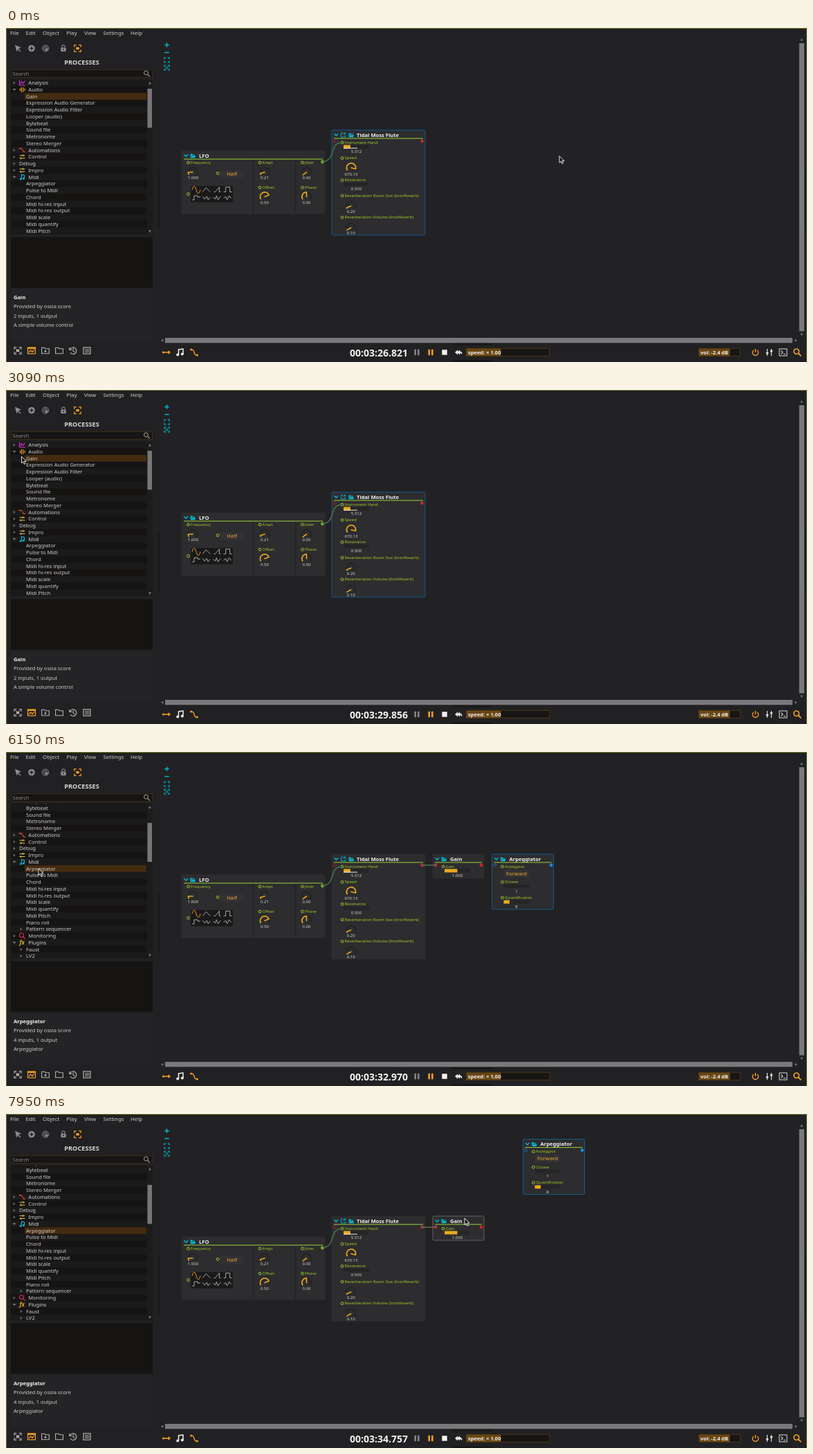
An HTML page for the animation above (7990 ms loop, 1158x484 px).

```html
<!DOCTYPE html>
<html lang="en">
<head>
<meta charset="utf-8">
<title>Process graph</title>
<style>
html, body { margin: 0; width: 100%; height: 100%; overflow: hidden; background: #212022; }
svg { display: block; width: 1158px; height: 484px; font-family: "Noto Sans", "Open Sans", sans-serif; font-size: 7.6px; }
text { fill: #cfcdcb; white-space: pre; }
.b { font-weight: 700; fill: #f2f2f2; }
.port { font-size: 5.95px; fill: #9cc92c; }
.val { font-size: 6px; fill: #d6d3ce; text-anchor: middle; }
.btn { font-size: 7.7px; fill: #e8a92c; text-anchor: middle; }
.ln { fill: none; stroke-width: 1.2; }
</style>
</head>
<body>
<svg id="stage" viewBox="0 0 1158 484"></svg>
<script>
const LOOP = 7990, ROW = 9.75;
const ORANGE = '#f0a020', CYAN = '#03bcd8', GREY = '#8f8d8f', GREEN = '#a0cc2c', RED = '#c42a2a', BLUE = '#1d86d8';

const text = (x, y, s, cls = '', more = '') => `<text x="${x}" y="${y}" class="${cls}" ${more}>${s}</text>`;
const rect = (x, y, w, h, fill, more = '') => `<rect x="${x}" y="${y}" width="${w}" height="${h}" fill="${fill}" ${more}/>`;
const line = (d, color, w = 1.2, more = '') => `<path class="ln" d="${d}" stroke="${color}" style="stroke-width:${w}" ${more}/>`;
const fill = (d, color) => `<path d="${d}" fill="${color}"/>`;
const dot = (x, y, color, r = 2.4) => `<circle cx="${x}" cy="${y}" r="${r}" fill="${color}"/>`;
const ring = (x, y, color = GREEN, r = 1.9, w = 1) => `<circle cx="${x}" cy="${y}" r="${r}" fill="none" stroke="${color}" stroke-width="${w}"/>`;
const at = (x, y, s) => `<g transform="translate(${x} ${y})">${s}</g>`;
const group = (id, s) => `<g id="${id}">${s}</g>`;

const corners = (r, c, w = 1.2) => {
  const k = r * 0.35;
  return line(`M${-r} ${-k}V${-r}H${-k}M${k} ${-r}H${r}V${-k}M${r} ${k}V${r}H${k}M${-k} ${r}H${-r}V${k}`, c, w);
};
const lens = (c, w = 1.3) => ring(-1, -1, c, 3, w) + line('M1.3 1.3L4.3 4.3', c, w * 1.2);
const folder = (c, k = 1) => line(`M${-4.5 * k} ${3.5 * k}V${-3.5 * k}H${-k}L0 ${-2.3 * k}H${4.5 * k}V${3.5 * k}Z`, c, 1.1);

// node parts
const port = (x, y, s) => ring(x, y) + text(x + 3.6, y + 1.8, s, 'port');
const value = (x, y, s) => text(x, y, s, 'val');
const slider = (x, y, w, v) => rect(x, y, w, 5, '#252426') + rect(x, y, w * v, 5, '#e6aa1e');
const polar = (r, deg) => [r * Math.cos(deg * Math.PI / 180), r * Math.sin(deg * Math.PI / 180)].map(n => n.toFixed(2)).join(' ');
const arc = (a, b, c, w) => line(`M${polar(6.6, a)}A6.6 6.6 0 ${b - a > 180 ? 1 : 0} 1 ${polar(6.6, b)}`, c, w);
const knob = (x, y, a) => at(x, y, arc(145, 395, '#222123', 1.6) +
  (a > 150 ? arc(145, a, '#e6aa1e', 1.7) : '') + line(`M0 0L${polar(6.6, a)}`, '#e6aa1e', 1.6, 'stroke-linecap="round"'));
const button = (x, y, w, h, s) => rect(x, y, w, h, '#343134', 'rx="1"') + text(x + w / 2, y + h / 2 + 2.7, s, 'btn');

function node(id, x, y, w, h, title, inner, ext) {
  const tx = x + (ext ? 36 : 25);
  return group(id, rect(x, y, w, h, '#2d2c2e', `rx="1.5" class="frame"`) +
    line(`M${x + 3.5} ${y + 5.3}l2.8 3 2.8-3`, CYAN, 1.3) +
    (ext ? at(x + 16.5, y + 7, line('M0-2.8H-3V3H3V0M0 0L3-3M1-3H3V-1', CYAN, .9)) : '') +
    at(x + (ext ? 28 : 16), y + 7.2, fill('M-3.5 3V-2.8H-.8L0-1.8H3V-.6H-2Z', CYAN) + fill('M-2 0H4.2L3 3H-3.2Z', CYAN)) +
    text(tx, y + 9.8, title, 'b') +
    rect(x + 3, y + 11.4, w - 6, 1.2, '#86b83a') + inner);
}

const wave = (x, y, d, c) => at(x, y, line(d, c, 1));
const waves = ['M-6 0C-4-7-2-7 0 0S4 7 6 0', 'M-6 3L-1-3L5 3', 'M-5 3H-3L3-4V3H5', 'M-6 3H-3V-4H3V3H6'];
const noisy = ['M-6 3H-3V-3H2V-1H6', 'M-6-2L-3 2L0-2L2 3L5-1', 'M-6-1L-3 2L-1-3L1 3L5-2', 'M-6 1L-3-2L-1 3L2-3L5 1'];

const lfo = node('lfo', 254, 178, 207, 91, 'LFO',
  rect(356.7, 191.5, 1.8, 76.5, '#242325') + rect(417.7, 191.5, 1.8, 76.5, '#242325') +
  port(263.5, 195, 'Frequency') + knob(270, 209, 180) + value(270.5, 218.8, '1.000') +
  ring(306, 210.5) + button(309, 206, 35, 11, 'Half') + ring(263.5, 240.5) +
  rect(267, 229, 61, 23.5, '#1a191a', 'rx="2"') +
  waves.map((d, i) => wave(275 + i * 15.2, 234.5, d, i ? '#a8a6a4' : ORANGE)).join('') +
  noisy.map((d, i) => wave(275 + i * 15.2, 246, d, '#a8a6a4')).join('') +
  port(367, 195, 'Ampl.') + knob(374, 209, 165) + value(374, 218.8, '0.21') +
  port(367, 231.2, 'Offset') + knob(374, 244.5, 338) + value(374, 255.3, '0.50') +
  port(428.5, 195, 'Jitter') + knob(434.5, 209, 145) + value(434.5, 218.8, '0.00') +
  port(428.5, 231.2, 'Phase') + knob(434.5, 244.5, 270) + value(434.5, 255.3, '0.00') +
  dot(457.5, 194, '#7db52c'));

const harp = node('harp', 471, 148, 135, 152, 'Tidal Moss Flute',
  ring(475, 164, '#8f2626', 2.2) + dot(601.5, 164, RED) +
  port(486, 166, 'Instrument Hand') + slider(488, 169.5, 37, .27) + rect(488, 173.6, 20, 1, '#eee') + value(506.5, 181, '5.312') +
  port(486, 188.5, 'Speed') + knob(499, 202.5, 375) + value(499, 213.5, '670.13') +
  port(486, 220.5, 'Resonance') + slider(488, 224, 37, 0) + value(506.5, 235.3, '0.500') +
  port(486, 243, 'Reverberation Room Size (InstrReverb)') + knob(498.7, 258, 158) + value(498.7, 267.8, '0.20') +
  port(486, 274.5, 'Reverberation Volume (InstrReverb)') + knob(498.7, 289.5, 152) + value(498.7, 299, '0.10'), true);

const gain = node('gain', 617, 148, 74, 35, 'Gain',
  dot(621, 164, RED) + dot(687, 164, RED) +
  port(632, 166, 'Gain') + slider(634, 169.5, 37, .5) + value(652.5, 181, '1.000'));

const arp = node('arp', 702.5, 148, 89, 80, 'Arpeggiator',
  ring(706.5, 164, '#1a70b5', 2.1) + dot(788, 164, BLUE) +
  port(717.5, 166, 'Arpeggios') + button(719, 170, 38, 12, 'Forward') +
  port(717.5, 188.5, 'Octave') + slider(719.5, 192, 37, 0) + value(738, 203.5, '1') +
  port(717.5, 211, 'Quantification') + slider(719.5, 214.7, 37, .23) + value(738, 226, '8'));

// process tree: > closed branch, v open branch, - leaf, + closed sub-branch
const tree = ['>Analysis', 'vAudio', '-Gain', '-Expression Audio Generator', '-Expression Audio Filter', '-Looper (audio)',
  '-Bytebeat', '-Sound file', '-Metronome', '-Stereo Merger', '>Automations', '>Control', '>Debug', '>Impro', 'vMidi',
  '-Arpeggiator', '-Pulse to Midi', '-Chord', '-Midi hi-res input', '-Midi hi-res output', '-Midi scale',
  '-Midi quantify', '-Midi Pitch', '-Piano roll', '+Pattern sequencer', '>Monitoring', 'vPlugins', '+Faust', '+LV2'];
const swap = line('M-4-2H4M-4 2H4', '#c9c76a', 1.1) + line('M1-3.5V-.5M-2 .5V3.5', ORANGE, 1.3);
const icons = {
  Analysis: line('M-4-4V3.5H4.5M-3 2L-1-2L1 1L4-3', '#d42fd0', 1.1),
  Audio: line('M-3-1.5V2M-1-3.5V4M1.5-3V3.5M3.7-1.5V1.5', ORANGE, 1.2),
  Automations: line('M-4-2.5H-1L2 2.5H4.5', '#e0492f', 1.2) + dot(-3.6, -2.4, '#e0492f', 1.1),
  Control: swap, Impro: swap,
  Midi: line('M-1 3V-3.5L3-2.5V2', CYAN, 1.1) + dot(-2.2, 3, CYAN, 1.4) + dot(1.8, 2.2, CYAN, 1.4),
  Monitoring: lens('#d62a50', 1.1),
  Plugins: text(-4, 2.6, 'fx', 'b', 'style="fill:#e6b41e;font-style:italic;font-size:8px"')
};
function row(s, i) {
  const kind = s[0], name = s.slice(1), y = 79.5 + i * ROW, leaf = kind === '-' || kind === '+';
  const ax = kind === '+' ? 22 : 12;
  const mark = kind === '-' ? '' : kind === 'v' ? fill(`M${ax - 2.5} ${y - 1.3}h5l-2.5 3Z`, '#777') : fill(`M${ax - 1.3} ${y - 2.3}v4.6l3-2.3Z`, '#666');
  return (i % 2 ? '' : rect(7, y - ROW / 2, 196, ROW, '#1b1a1a')) +
    (leaf && (name === 'Gain' || name === 'Arpeggiator') ? rect(27, y - ROW / 2, 176, ROW, '#442b10', `id="row${name}"`) : '') +
    mark + (icons[name] && !leaf ? at(23.5, y, icons[name]) : '') +
    text(leaf ? 29 : name === 'Debug' ? 19 : 32.3, y + 2.7, name);
}

const info = (id, lines) => group(id, lines.map((s, i) => text(11, 392.5 + i * 13.6, s, i ? '' : 'b')).join(''));
const menu = [[6, 'File'], [28.5, 'Edit'], [53, 'Object'], [87.5, 'Play'], [113, 'View'], [140.5, 'Settings'], [180, 'Help']];
const tri = (x, y, dx, dy) => fill(`M${x + 2.2 * dx} ${y + 2.2 * dy}L${x - 1.5 * dx + 2 * dy} ${y - 1.5 * dy + 2 * dx}L${x - 1.5 * dx - 2 * dy} ${y - 1.5 * dy - 2 * dx}Z`, '#747274');

const sidebar =
  menu.map(([x, s]) => text(x, 10, s, '', 'style="font-size:7.9px"')).join('') +
  at(17, 29.5, fill('M-4-5L5-1L1 .5L4.5 4L3.5 5L0 1.5L-1.5 5Z', GREY)) +
  at(37, 29.5, dot(0, 0, GREY, 4.8) + line('M-2.8 0H2.8M0-2.8V2.8', '#212022', 1.4)) +
  at(57, 29.5, ring(0, 0, GREY, 4.6, 1) + ring(0, 0, GREY, 2.5, 1) + fill('M-1-1L5 1.5L2.5 2.5L1.5 5Z', GREY)) +
  at(83, 29.5, rect(-3.7, -1, 7.4, 5.5, GREY, 'rx="1"') + line('M-2.2-1V-2.5A2.2 2.2 0 0 1 2.2-2.5V-1', GREY, 1.1) + dot(0, 1.8, '#212022', 1)) +
  at(103.5, 29.5, corners(4.8, ORANGE, 1.2) + rect(-2.2, -1.7, 4.4, 3.4, ORANGE)) +
  text(109.5, 52.7, 'PROCESSES', 'b', 'text-anchor="middle" style="fill:#d8d6d4;font-size:9.2px"') +
  rect(7.5, 60.5, 204, 11, '#161514', 'stroke="#3b2b14" stroke-width="1"') +
  text(9.5, 68.8, 'Search', '', 'style="fill:#8b8987"') + at(203.5, 66, lens('#a5a3a1', 1)) +
  rect(7, 75, 205, 224, '#151413') +
  `<g clip-path="url(#list)">${group('tree', tree.map(row).join(''))}</g>` +
  rect(203.5, 75, 8.5, 224, '#1d1c1d') + tri(208, 80, 0, -1) + tri(208, 294.5, 0, 1) +
  rect(204.5, 88, 6.5, 56.5, '#787678', 'id="thumb"') +
  rect(7, 303, 205, 73.5, '#151413') + rect(7, 378, 205, 75, '#242325') +
  info('infoGain', ['Gain', 'Provided by ossia score', '2 inputs, 1 output', 'A simple volume control']) +
  info('infoArp', ['Arpeggiator', 'Provided by ossia score', '4 inputs, 1 output', 'Arpeggiator']) +
  at(17, 467.5, corners(5, '#b5b3b1', 1.2) + line('M-4-4L4 4M4-4L-4 4', '#b5b3b1', 1) + rect(-2, -1.7, 4, 3.4, '#b5b3b1')) +
  at(37, 467.5, rect(-5.5, -4.5, 11, 9, 'none', `stroke="${ORANGE}" stroke-width="1.2"`) + line('M-5.5-3.5H5.5', ORANGE, 2) + line('M-4 2.5L-1.5-.5L1 2L4-1.5', ORANGE, 1.2)) +
  at(57, 467.5, folder('#b5b3b1', 1.2) + fill('M-2 2L0-1.5L2 2Z', '#b5b3b1')) +
  at(77, 467.5, folder('#b5b3b1', 1.2)) +
  at(97, 467.5, line('M-4.2-2A4.8 4.8 0 1 1-4 2.8M-5.2-4.5V-1.2H-2M0-3V.5L2.5 2', '#b5b3b1', 1.2)) +
  at(117, 467.5, rect(-5, -4.7, 10, 9.4, 'none', 'stroke="#b5b3b1" stroke-width="1.2"') + line('M-3-2H3.5M-3 0H3.5M-3 2H3.5', '#b5b3b1', .9));

const canvas =
  rect(222, 14, 924, 434, '#222124') + rect(219.5, 205, 2.5, 87, '#1a191b') +
  at(232.5, 24.5, line('M-3.2 0H3.2M0-3.2V3.2', CYAN, 1.4)) + at(232.5, 35.5, line('M-3.2 0H3.2', CYAN, 1.4)) +
  at(232.5, 46.5, corners(3.5, CYAN, 1.2)) + at(232.5, 57.5, corners(3.5, CYAN, 1.2) + ring(0, 0, CYAN, 1.4, 1)) +
  rect(230, 449, 907, 7.3, '#7a787a') + tri(226, 452.7, -1, 0) + tri(1142, 452.7, 1, 0) +
  rect(1146.7, 22, 7.3, 417.5, '#7a787a') + tri(1150.3, 17, 0, -1) + tri(1150.3, 444, 0, 1) +
  rect(645, 457.5, 58, 2, '#171617') + rect(645, 481.5, 58, 2.5, '#171617') + rect(1155.5, 205, 2, 87, '#1a191b');

const bar = (x, w, v, s) => rect(x, 464.3, w, 11.2, '#171615') + rect(x, 464.3, v, 11.2, '#6a4714') +
  rect(x, 464.3, w, 11.2, 'none', 'stroke="#4a3514" stroke-width="1"') + text(x + 2.5, 472.7, s, 'b', 'style="font-size:7.5px"');
const pause = c => rect(-3.6, -4.2, 2.6, 8.4, c) + rect(1, -4.2, 2.6, 8.4, c);
const transport =
  at(232, 470, line('M-5.5 0H4', ORANGE, 1.5) + dot(-4.5, 0, ORANGE, 1.6) + fill('M2.5-3L6 0L2.5 3Z', ORANGE)) +
  at(252, 470, line('M-2.5 3V-4L4-5V2', '#eee', 1.5) + dot(-3.8, 3.5, '#eee', 2) + dot(2.8, 2.5, '#eee', 2)) +
  at(272, 470, line('M-4.5-4C3-4-3 4 4.5 4', ORANGE, 1.4) + dot(-4.3, -4, ORANGE, 1.6) + dot(4.3, 4, ORANGE, 1.6)) +
  text(497, 475.6, '', 'b', 'id="clock" style="font-size:14px"') +
  at(594, 470, pause('#858385')) + at(614, 470, pause(ORANGE)) + rect(630.3, 466.3, 7.4, 7.4, '#f2f2f2') +
  at(654.5, 470, fill('M-5.5 0L-1.5-3.5V3.5Z', '#f2f2f2') + fill('M-2.5 0L1.5-3.5V-1.5Q5-1.5 5 3Q3.5 1.2 1.5 1.3V3.5Z', '#f2f2f2')) +
  bar(665.5, 120.5, 50, 'speed: × 1.00') + bar(1001.5, 60, 45, 'vol: -2.4 dB') +
  at(1083.5, 470, line('M-2.6-3A4.2 4.2 0 1 0 2.6-3M0-5V0', ORANGE, 1.4)) +
  at(1103.5, 470, line('M-3-5V5M3-5V5', '#ddd', 1.2) + rect(-4.7, 0, 3.4, 2.4, '#ddd') + rect(1.3, -3, 3.4, 2.4, '#ddd')) +
  at(1123.5, 470, rect(-5.5, -5, 11, 10, 'none', 'stroke="#ccc" stroke-width="1.1"') + line('M-3-2.5L-.5 0L-3 2.5M.5 2.5H3.5', '#ccc', 1.1)) +
  at(1144, 470, `<g transform="scale(1.25)">${lens(ORANGE)}</g>`);

const $ = id => document.getElementById(id);
$('stage').innerHTML = '<clipPath id="list"><rect x="7" y="75" width="205" height="224"/></clipPath>' +
  rect(0, 0, 1158, 484, '#212022') + sidebar + canvas + lfo + harp + gain + arp +
  line('M457.5 194C478 192 466 166 486 166', '#44694c', 1.8) +
  line('M601.5 164H621', '#4d6650', 1.8, 'id="cable"') + transport +
  line('M.5 484V.5H1157.5V484', '#6d7a22', 1) +
  group('cursor', '<path d="M0 0V9.6L2.2 7.6L3.8 11.2L5.5 10.4L3.9 7H7Z" fill="#111" stroke="#fff" stroke-width=".9"/>');

// time, x, y, easing into this key
const path = [[0, 800, 185.5], [180, 800, 185.5], [760, 385, 186], [1250, 385, 186], [1780, 521, 158], [2140, 522, 159],
  [2280, 522, 159], [3000, 18, 96], [3250, 33, 97], [3650, 33, 97], [4050, 34, 172], [4200, 34, 172], [4600, 40, 216],
  [4930, 40, 216], [5350, 31, 143], [5760, 47, 169], [6180, 47, 169], [6500, 440, 146.5, 'in'], [6760, 754, 146.5, 'out'],
  [6980, 754, 150], [7070, 755, 149], [7410, 799, 38.5], [7480, 799, 38.5], [7740, 468, 152], [7930, 663, 151], [LOOP, 663, 151]];
const ease = { in: u => u * u, out: u => u * (2 - u), both: u => u * u * (3 - 2 * u) };
const clock = [[0, 26821], [2140, 28901], [4050, 30821], [4620, 31429], [6150, 32970], [7070, 33861], [7950, 34757], [LOOP, 34797]];
const picks = [[0, 'harp'], [950, 'lfo'], [1720, 'harp'], [3500, 'gain'], [6000, 'arp']];
const boxes = { lfo: [254, 178, 207, 91], harp: [471, 148, 135, 152], gain: [617, 148, 74, 35], arp: [702.5, 148, 89, 80] };

function segment(keys, t) {
  let i = 1;
  while (i < keys.length - 1 && t > keys[i][0]) i++;
  const a = keys[i - 1], b = keys[i];
  return [a, b, (t - a[0]) / (b[0] - a[0])];
}
const show = (id, on) => { $(id).style.display = on ? '' : 'none'; };

function draw(t) {
  const [a, b, u] = segment(path, t), k = ease[b[3] || 'both'](u);
  const x = a[1] + (b[1] - a[1]) * k, y = a[2] + (b[2] - a[2]) * k;
  $('cursor').setAttribute('transform', `translate(${x.toFixed(2)} ${y.toFixed(2)})`);

  const [c, d, v] = segment(clock, t);
  $('clock').textContent = '00:03:' + ((c[1] + (d[1] - c[1]) * v) / 1000).toFixed(3);

  const steps = [4250, 4340, 4430].filter(s => t >= s).length;
  $('tree').setAttribute('transform', `translate(0 ${-18.9 * steps})`);
  $('thumb').setAttribute('y', 88 + 4.9 * steps);

  const chosen = t >= 5880;
  show('rowGain', !chosen);
  show('infoGain', !chosen);
  show('rowArpeggiator', chosen);
  show('infoArp', chosen);
  show('gain', t >= 3500);
  show('cable', t >= 3500);
  show('arp', t >= 6000);

  const drag = t < 6980 ? [0, 0] : t < 7410 ? [x - 754, y - 150] : [45, -111.5];
  $('arp').setAttribute('transform', `translate(${drag[0].toFixed(2)} ${drag[1].toFixed(2)})`);

  const picked = picks.filter(p => t >= p[0]).pop()[1];
  for (const id in boxes) {
    const [bx, by, w, h] = boxes[id], over = id !== 'arp' && x >= bx && x <= bx + w && y >= by && y <= by + h;
    $(id).querySelector('.frame').setAttribute('stroke', id === picked ? '#145a8e' : over ? '#646264' : '#2d2c2e');
  }
}

function tick() {
  draw(Math.floor(performance.now() % LOOP / 10) * 10);
  requestAnimationFrame(tick);
}
tick();
</script>
</body>
</html>
```
